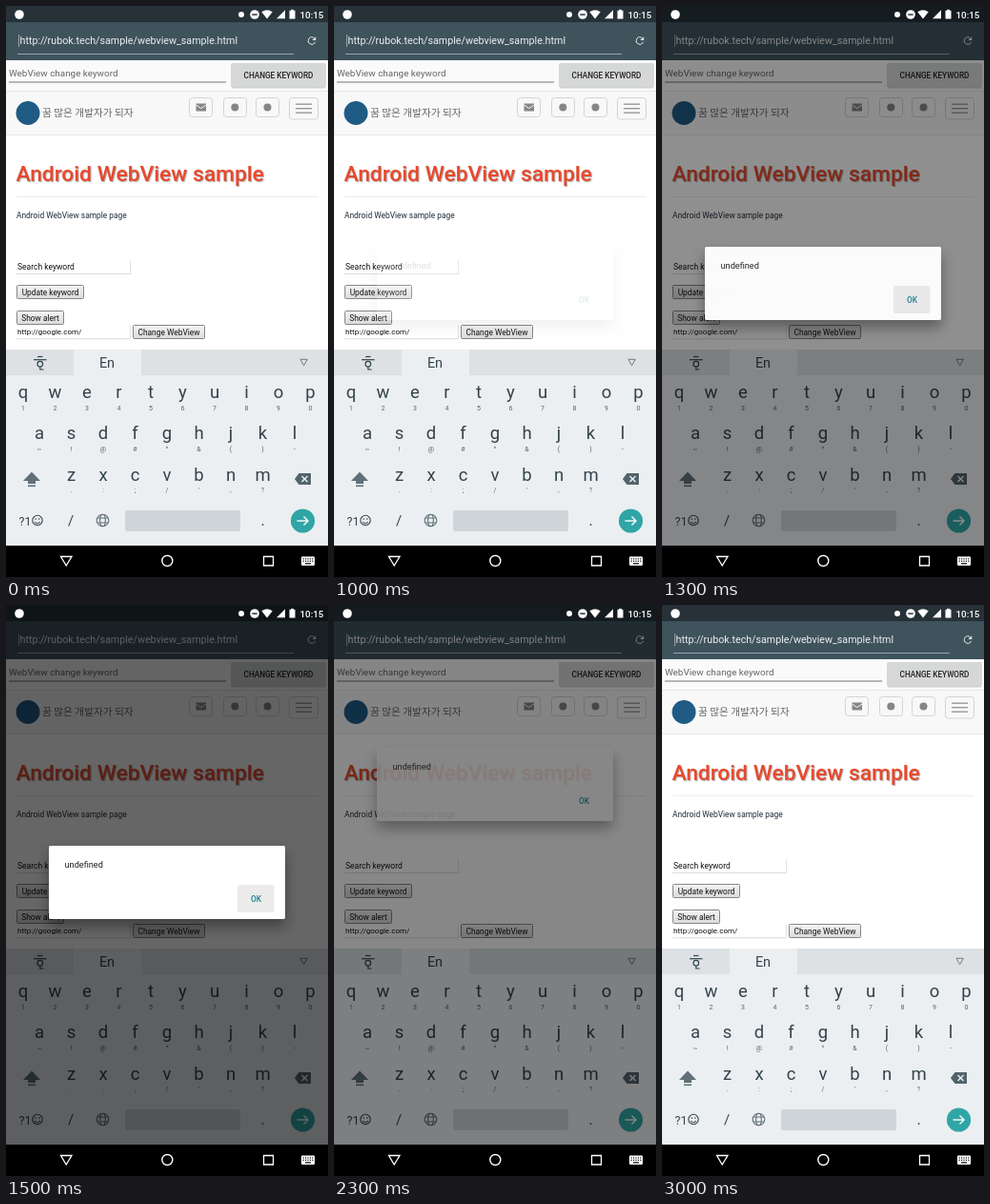
Recreate the animation shown at these times as an HTML page with a canvas. Size 338 by 600 pixels, loop 3100 ms.

```html
<!DOCTYPE html>
<html lang="en">
<head>
<meta charset="utf-8">
<title>WebView alert</title>
<style>
  html, body { margin: 0; width: 100%; height: 100%; overflow: hidden; background: #000; }
  canvas { display: block; width: 338px; height: 600px; }
</style>
</head>
<body>
<canvas id="stage"></canvas>
<script>
const W = 338, H = 600, LOOP = 3100, STEP = 100, CLOSE = 2100;
const canvas = document.getElementById('stage');
const ctx = canvas.getContext('2d');
const ratio = window.devicePixelRatio || 1;
canvas.width = W * ratio;
canvas.height = H * ratio;
ctx.scale(ratio, ratio);

const BAR = '#3f535d', KEY = '#34434b', HINT = '#56646b', ICON = '#607078', WEB_ICON = '#868686';

// [time, value] pairs, joined by straight lines
const DIALOG_ALPHA = [[900, 0], [1000, .14], [1100, .5], [1200, .85], [1300, .97], [1400, 1],
                      [2200, 1], [2300, .87], [2400, .5], [2500, .1], [2600, 0]];
const DIM = [[1000, 0], [1300, .44], [1400, .6], [2100, .6], [2500, .34], [2600, 0]];
const FOCUS = [[1000, 0], [1300, 1], [1500, 1], [2000, 0]];

function sample(track, t) {
  if (t <= track[0][0]) return track[0][1];
  for (let i = 1; i < track.length; i++) {
    const [t0, v0] = track[i - 1], [t1, v1] = track[i];
    if (t <= t1) return v0 + (v1 - v0) * (t - t0) / (t1 - t0);
  }
  return track[track.length - 1][1];
}

function rect(x, y, w, h, color) {
  ctx.fillStyle = color;
  ctx.fillRect(x, y, w, h);
}

function box(x, y, w, h, radius, fill, stroke) {
  ctx.beginPath();
  ctx.roundRect(x, y, w, h, radius);
  if (fill) { ctx.fillStyle = fill; ctx.fill(); }
  if (stroke) { ctx.strokeStyle = stroke; ctx.lineWidth = 1; ctx.stroke(); }
}

function disc(x, y, r, color) {
  ctx.beginPath();
  ctx.arc(x, y, r, 0, Math.PI * 2);
  ctx.fillStyle = color;
  ctx.fill();
}

function ring(x, y, r, color, width = 1.2) {
  ctx.beginPath();
  ctx.arc(x, y, r, 0, Math.PI * 2);
  ctx.strokeStyle = color;
  ctx.lineWidth = width;
  ctx.stroke();
}

function line(points, color, width = 1.2, closed = false) {
  ctx.beginPath();
  points.forEach(([x, y]) => ctx.lineTo(x, y));
  if (closed) ctx.closePath();
  ctx.strokeStyle = color;
  ctx.lineWidth = width;
  ctx.stroke();
}

function poly(points, color) {
  ctx.beginPath();
  points.forEach(([x, y]) => ctx.lineTo(x, y));
  ctx.fillStyle = color;
  ctx.fill();
}

function text(str, x, y, size, color, { weight = 400, align = 'left', family = 'Roboto' } = {}) {
  ctx.font = `${weight} ${size}px "${family}", sans-serif`;
  ctx.textAlign = align;
  ctx.fillStyle = color;
  ctx.fillText(str, x, y);
}

const centred = (str, x, y, size, color, weight = 400) =>
  text(str, x, y, size, color, { weight, align: 'center' });

function drawStatusIcons() {
  disc(14, 9, 4.8, '#fff');
  disc(247, 9, 3, '#fff');
  disc(261, 9, 4.8, '#fff');
  rect(258.3, 8.3, 5.4, 1.5, '#263238');
  ctx.beginPath();
  ctx.moveTo(274, 13.5);
  ctx.lineTo(268.3, 6.2);
  ctx.quadraticCurveTo(274, 2.2, 279.7, 6.2);
  ctx.fillStyle = '#fff';
  ctx.fill();
  poly([[284, 13.3], [293, 13.3], [293, 4.2]], '#fff');
  rect(299, 3.8, 3, 2, '#fff');
  rect(297.5, 4.8, 6, 8.7, '#fff');
  text('10:15', 308.5, 12.7, 9.8, '#fff', { weight: 500 });
}

function drawToolbar() {
  rect(0, 0, W, 17, '#263238');
  rect(0, 17, W, 40, BAR);
  rect(13, 30, .8, 13, '#aebbc1');
  text('http://rubok.tech/sample/webview_sample.html', 14.5, 40.3, 10.7, '#eceff1');
  rect(12, 50, 290, 1, '#9aa5aa');
  ctx.beginPath();
  ctx.arc(321, 36.5, 3.7, .35, Math.PI * 1.72);
  ctx.strokeStyle = '#eceff1';
  ctx.lineWidth = 1;
  ctx.stroke();
  poly([[325.2, 32.2], [325.2, 36], [321.4, 36]], '#eceff1');
}

function drawKeywordRow() {
  rect(0, 57, W, 33, '#fafafa');
  text('WebView change keyword', 3, 74.2, 9.9, '#666');
  rect(3, 79.5, 228, 1, '#777');
  rect(237, 84.5, 98, 2, '#cfcfcf');
  box(236, 60, 100, 25.2, 1.5, '#d6d7d7');
  centred('CHANGE KEYWORD', 286, 75.8, 8.2, '#222', 500);
}

function drawSiteHeader() {
  rect(0, 89, W, 47, '#f8f8f8');
  rect(0, 89, W, 1, '#e7e7e7');
  rect(0, 135, W, 1, '#e7e7e7');
  disc(23, 112.5, 12.5, '#1f5b84');
  text('꿈 많은 개발자가 되자', 38, 116, 10.7, '#666', { family: 'Noto Sans CJK KR' });
  [192.5, 228.5, 262.5].forEach(x => box(x, 96.5, 24, 20, 3, '#f8f8f8', '#d4d4d4'));
  rect(199.5, 102.5, 10.5, 8, WEB_ICON);
  line([[199.5, 104], [204.75, 107.6], [210, 104]], '#f8f8f8', 1);
  disc(240.3, 106.5, 4, WEB_ICON);
  disc(274.5, 106.5, 4, WEB_ICON);
  box(297.5, 96.5, 30, 22.5, 3, '#f8f8f8', '#d4d4d4');
  [102.5, 107, 111.5].forEach(y => rect(304, y, 17, 1.4, '#999'));
}

function webButton(label, x, y, w) {
  const shade = ctx.createLinearGradient(0, y, 0, y + 14);
  shade.addColorStop(0, '#f4f4f4');
  shade.addColorStop(1, '#dcdcdc');
  box(x + .5, y + .5, w - 1, 14, 1, shade, '#868686');
  centred(label, x + w / 2, y + 10.6, 8.4, '#111');
}

function webInput(value, y, size) {
  text(value, 12, y, size, '#111');
  rect(11, y + 4, 120, 1, '#dcdcdc');
  rect(130, y - 10, 1, 14, '#e3e3e3');
}

function drawPage() {
  rect(0, 136, W, 225, '#fff');
  ctx.save();
  ctx.shadowColor = '#aaa';
  ctx.shadowBlur = ratio;
  ctx.shadowOffsetX = ctx.shadowOffsetY = ratio;
  text('Android WebView sample', 10.5, 183.5, 22.8, '#e9482c', { weight: 500 });
  ctx.restore();
  rect(11, 200, 316, 1, '#ececec');
  text('Android WebView sample page', 11, 223.2, 8.4, '#1f2b38');
  webInput('Search keyword', 277, 8.5);
  webButton('Update keyword', 11, 293, 71);
  webButton('Show alert', 11, 320, 50);
  webInput('http://google.com/', 345.3, 8);
  webButton('Change WebView', 133, 335, 76);
}

function keyRow(letters, hints, x, y) {
  [...letters].forEach((letter, i) => {
    const cx = x + i * 33.5;
    centred(letter, cx, y, 18.5, KEY);
    centred(hints[i], cx, y + 12.2, 7, HINT);
  });
}

function drawKeyboard() {
  rect(0, 361, W, 206, '#eceff1');
  rect(0, 361, W, 27, '#dde1e4');
  rect(71, 361, 71, 27, '#eceff1');
  line([[33, 368.5], [38.5, 368.5]], KEY);
  line([[29, 371.7], [42.5, 371.7]], KEY);
  ring(35.8, 376.2, 2.8, KEY);
  line([[35.8, 379], [35.8, 382], [39.5, 382]], KEY);
  centred('En', 106, 380, 14.5, KEY);
  line([[309, 371.3], [316.3, 371.3], [312.6, 377.8]], '#6d7b82', 1, true);

  keyRow('qwertyuiop', '1234567890', 18, 412.3);
  keyRow('asdfghjkl', '~!@#^&()-', 35, 455.3);
  keyRow('zxcvbnm', '.:;/\',?', 68.5, 498.7);

  poly([[27, 489.5], [36, 499], [31, 499], [31, 502], [23, 502], [23, 499], [18, 499]], ICON);
  rect(23, 503.5, 8, 1.6, ICON);
  poly([[303, 497], [307.5, 491], [320, 491], [320, 503], [307.5, 503]], '#52636b');
  line([[310.5, 494], [316.5, 500]], '#eceff1', 1.4);
  line([[316.5, 494], [310.5, 500]], '#eceff1', 1.4);

  text('?1', 13.5, 545.5, 12.5, KEY);
  ring(33, 540.5, 5.2, KEY, 1.1);
  disc(31.2, 539, .8, KEY);
  disc(34.8, 539, .8, KEY);
  ctx.beginPath();
  ctx.arc(33, 541, 2.7, .3, Math.PI - .3);
  ctx.stroke();
  centred('/', 68, 546, 15, KEY);

  ring(101.5, 540.5, 6.3, ICON, 1.1);
  ctx.beginPath();
  ctx.ellipse(101.5, 540.5, 2.8, 6.3, 0, 0, Math.PI * 2);
  ctx.stroke();
  [538, 543].forEach(y => line([[96, y], [107, y]], ICON, 1));

  box(125, 530, 121, 22, 2, '#cfd4d9');
  centred('.', 269.5, 546, 16, KEY);
  disc(311.5, 541, 12.6, '#30a5a6');
  line([[305.5, 541], [317, 541]], '#fff', 1.4);
  line([[312.5, 536.5], [317, 541], [312.5, 545.5]], '#fff', 1.4);
}

function drawNavBar() {
  rect(0, 567, W, 33, '#000');
  line([[57.5, 578.5], [69, 578.5], [63.2, 588]], '#fff', 1.3, true);
  ring(169.3, 583, 5.5, '#fff', 1.4);
  line([[270.5, 578.5], [280.5, 578.5], [280.5, 588], [270.5, 588]], '#fff', 1.3, true);
  box(310, 578.5, 14, 9.5, 1, '#fff');
  for (let i = 0; i < 5; i++) {
    rect(311.6 + i * 2.4, 580.3, 1.2, 1.2, '#000');
    rect(311.6 + i * 2.4, 582.7, 1.2, 1.2, '#000');
  }
  rect(314, 585.3, 6, 1.2, '#000');
}

function drawDialog(t) {
  const alpha = sample(DIALOG_ALPHA, t);
  if (alpha === 0) return;
  const slide = Math.min(1, Math.max(0, (t - CLOSE) / 200));
  const x = 45, y = 253 - 103 * (1 - (1 - slide) ** 3), w = 248, h = 77;
  ctx.save();
  ctx.globalAlpha = alpha;

  // the shadow falls only outside the card
  ctx.save();
  ctx.beginPath();
  ctx.rect(0, 0, W, 567);
  ctx.roundRect(x, y, w, h, 2);
  ctx.clip('evenodd');
  ctx.shadowColor = 'rgba(0,0,0,.36)';
  ctx.shadowBlur = 14 * ratio;
  ctx.shadowOffsetY = 8 * ratio;
  box(x, y, w, h, 2, '#fff');
  ctx.restore();

  box(x, y, w, h, 2, '#fff');
  box(243, y + 41, 38.5, 29, 2, `rgba(0,0,0,${.08 * sample(FOCUS, t)})`);
  text('undefined', 61.5, y + 23, 9.2, '#212121');
  centred('OK', 262.5, y + 58.8, 8.3, '#14808f', 500);
  ctx.restore();
}

function drawDim(t) {
  rect(0, 0, W, 567, `rgba(0,0,0,${sample(DIM, t)})`);
}

function draw(t) {
  drawToolbar();
  drawKeywordRow();
  drawSiteHeader();
  drawPage();
  drawKeyboard();
  // a closing dialog sinks below the dim layer
  const layers = t > CLOSE ? [drawDialog, drawDim] : [drawDim, drawDialog];
  layers.forEach(layer => layer(t));
  drawStatusIcons();
  drawNavBar();
}

const start = performance.now();
function tick() {
  const t = (performance.now() - start) % LOOP;
  draw(Math.floor(t / STEP) * STEP);
  requestAnimationFrame(tick);
}
tick();
</script>
</body>
</html>
```
